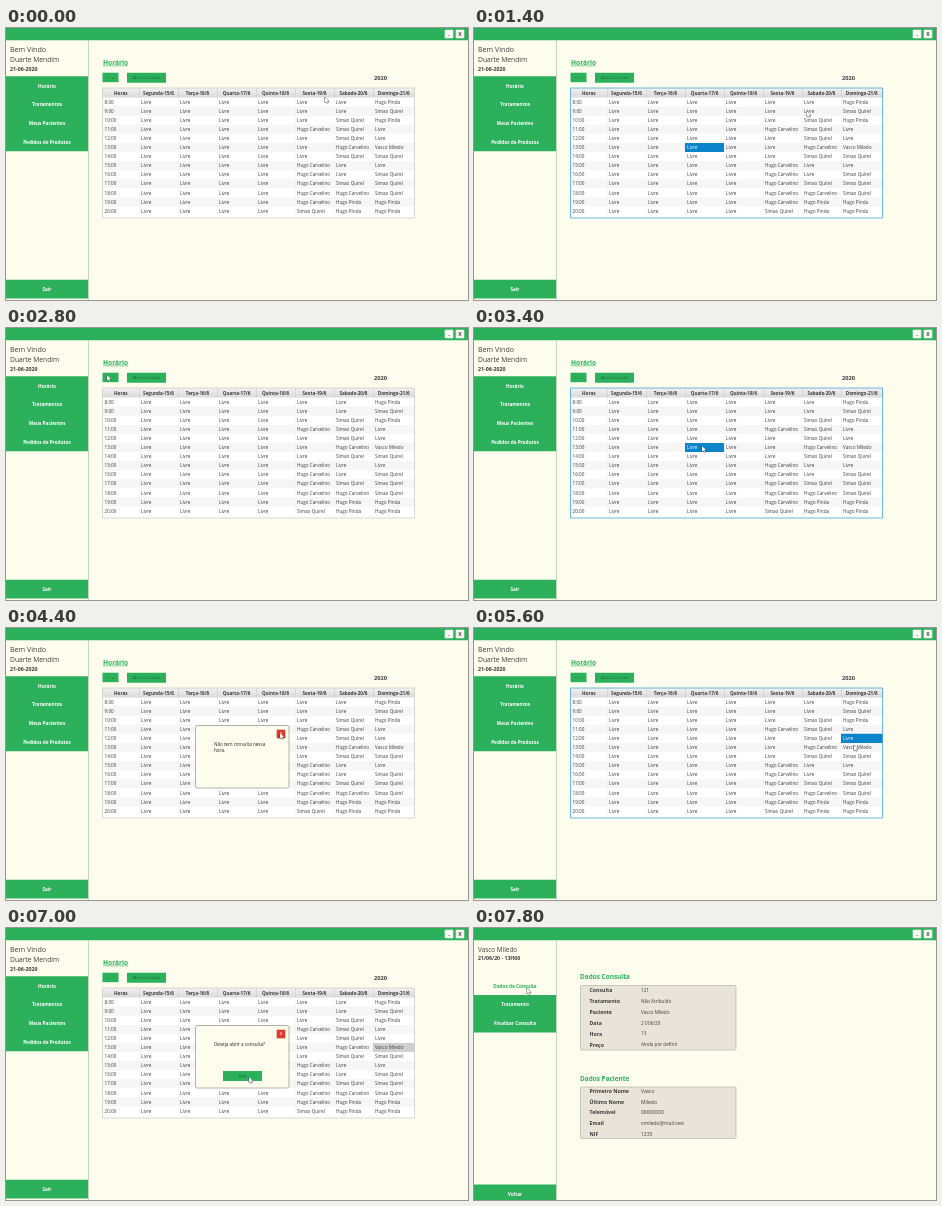
An HTML page with a canvas for the animation above (8000 ms loop, 462 px wide and 272 px high).

```html
<!DOCTYPE html>
<html lang="pt">
<head>
<meta charset="utf-8">
<title>Horário</title>
<style>
html, body { margin: 0; width: 100%; height: 100%; overflow: hidden; background: #fdfdee; }
canvas { display: block; width: 462px; height: 272px; }
</style>
</head>
<body>
<canvas id="stage"></canvas>
<script>
const W = 462, H = 272, LOOP = 8000, STEP = 200;
const GREEN = '#2db05b', CREAM = '#fdfdee', INK = '#3c3c3c';
const canvas = document.getElementById('stage');
const ctx = canvas.getContext('2d');
const scale = window.devicePixelRatio || 1;
canvas.width = W * scale;
canvas.height = H * scale;

const people = { L: 'Livre', D: 'Hugo Pinda', F: 'Hugo Carvelino', V: 'Simao Quirel', B: 'Vasco Miledo' };
const headers = ['Horas', 'Segunda-15/6', 'Terça-16/6', 'Quarta-17/6', 'Quinta-18/6',
  'Sexta-19/6', 'Sabado-20/6', 'Domingo-21/6'];
const free = 'L'.repeat(13);
const week = [free, free, free, free, 'LLLFLLLFFFFFV', 'LLVVVFVLLVFDD', 'DVDLLBVLVVVDD'];

const table = { x: 96.5, y: 60, w: 312, h: 130, first: 69.5, row: 9.08 };
const columnX = c => c ? 94 + 39 * c : table.x;
const pointer = new Path2D('M0 0V5.6L1.3 4.4L2.2 6.4L3.1 6L2.2 4.1H4Z');

// Pointer stops: time, x, y
const stops = [
  [0, 319, 69], [200, 319, 69], [800, 230, 119], [1000, 230, 119], [1400, 333, 83],
  [1600, 333, 83], [2400, 106, 48], [2800, 101, 47], [3000, 101, 47], [3400, 228, 118],
  [3600, 228, 118], [4000, 142, 49], [4200, 200, 80], [4400, 274, 105], [4600, 274, 105],
  [5000, 365, 108], [5400, 382, 112], [5600, 380, 117], [5800, 381, 119], [6000, 381, 119],
  [6600, 142, 49], [6800, 210, 120], [7000, 243, 149], [7400, 243, 149], [7800, 53, 60], [8000, 53, 60]
];

// Selected cell: from, to, column, row, focused
const selections = [
  [800, 2400, 3, 5, true], [3400, 4000, 3, 5, true], [4000, 5200, 3, 5, false],
  [5200, 5800, 7, 4, true], [5800, 6600, 7, 5, true], [6600, 7400, 7, 5, false]
];

function box(x, y, w, h, fill, stroke, radius = 0) {
  ctx.beginPath();
  ctx.roundRect(x, y, w, h, radius);
  ctx.fillStyle = fill;
  ctx.fill();
  if (stroke) {
    ctx.strokeStyle = stroke;
    ctx.lineWidth = 0.7;
    ctx.stroke();
  }
}

// y is the middle of the capital letters
function text(str, x, y, size, { color = INK, bold = false, align = 'left' } = {}) {
  ctx.font = `${bold ? 700 : 400} ${size}px "Open Sans", "Noto Sans", sans-serif`;
  ctx.textAlign = align;
  ctx.fillStyle = color;
  ctx.fillText(str, x, y + size * 0.36);
}

function button(label, x, y, w, h, size) {
  box(x, y, w, h, GREEN);
  text(label, x + w / 2, y + h / 2, size, { color: '#176b36', align: 'center' });
}

function menu(labels, y, h = 18.75) {
  box(0, y, 82, h * labels.length, GREEN);
  labels.forEach((label, i) =>
    text(label, 41, y + h * (i + 0.5) + 0.4, 4.7, { color: '#fff', bold: true, align: 'center' }));
}

function drawWindow() {
  box(0, 0, W, H, CREAM);
  box(0, 0, W, 12.3, GREEN);
  box(82, 12.3, 0.8, H, '#b4cbae');
  for (const [x, label] of [[439, '_'], [450, 'X']]) {
    box(x, 2, 8, 8, '#fbfbf4', '#dcebdc');
    text(label, x + 4, label === '_' ? 5 : 6, 5, { bold: true, align: 'center' });
  }
}

function drawTable(selection) {
  const { x, y, w, h, first, row } = table;
  const focused = selection && selection[4];
  box(x, y, w, h, '#fff');
  const shade = ctx.createLinearGradient(0, y, 0, first);
  shade.addColorStop(0, '#f1f1f1');
  shade.addColorStop(1, '#dadada');
  box(x, y, w, first - y, shade);
  for (let r = 1; r < 13; r += 2) box(x, first + r * row, w, row, '#f6f6f6');
  headers.forEach((header, c) => {
    const left = columnX(c);
    const right = c < 7 ? columnX(c + 1) : x + w;
    text(header, (left + right) / 2, 65, 4.6, { bold: true, align: 'center' });
    if (c) {
      box(left, y, 0.5, first - y, '#c8c8c8');
      box(left, first, 0.4, 13 * row, '#ededed');
    }
    for (let r = 0; r < 13; r++) {
      const top = first + r * row;
      const picked = selection && selection[2] === c && selection[3] === r;
      if (picked) box(left, top, right - left, row, focused ? '#0b84cc' : '#d0d0d0');
      const label = c ? people[week[c - 1][r]] : `${r + 8}:00`;
      text(label, left + 2, top + row / 2, 4.65, { color: picked && focused ? '#fff' : INK });
    }
  });
  box(x, y, w, h, 'transparent', focused ? '#2b9bd8' : '#c8c8c2');
}

function drawDialog(confirm) {
  const dark = { color: '#222' };
  box(189.5, 97.5, 93.5, 62.5, CREAM, '#93938a', 2);
  box(271, 102, 8, 8, '#e23a2c', '#c9483c');
  text('x', 275, 105.6, 4.5, { color: '#fff', align: 'center' });
  if (confirm) {
    text('Deseja abrir a consulta?', 208, 116.8, 4.6, dark);
    button('Sim', 217, 143, 39, 10, 4.6);
  } else {
    text('Não tem consulta nessa', 208, 116.6, 4.6, dark);
    text('hora.', 208, 122.8, 4.6, dark);
  }
}

function drawSchedule(time) {
  text('Bem Vindo', 4, 21.5, 7.1);
  text('Duarte Mendim', 4, 31.5, 6.7);
  text('21-06-2020', 4, 41, 5.3, { bold: true });
  menu(['Horário', 'Tratamentos', 'Meus Pacientes', 'Pedidos de Produtos'], 48.2);
  menu(['Sair'], 251.7);
  text('Horário', 97, 34.2, 6.6, { color: GREEN, bold: true });
  box(97, 37.6, 25, 0.6, GREEN);
  button('<   >', 96.5, 44.7, 16, 9.5, 4.3);
  button('Abrir Consulta', 121, 44.7, 39, 10, 4.15);
  text('2020', 368, 50, 5.7, { bold: true });
  drawTable(selections.find(s => time >= s[0] && time < s[1]));
  if (time >= 4000 && time < 4600) drawDialog(false);
  if (time >= 6600) drawDialog(true);
}

function drawPanel(title, titleY, y, h, rows, firstRow, pitch, valueSize) {
  text(title, 106, titleY, 6.45, { color: GREEN, bold: true });
  box(106.5, y, 155.5, h, '#e9e4d9', '#b9b5ab', 1);
  rows.forEach(([label, value], i) => {
    text(label, 115.5, firstRow + i * pitch, 5.2, { bold: true });
    text(value, 167, firstRow + i * pitch, valueSize);
  });
}

function drawAppointment() {
  text('Vasco Miledo', 4, 21.5, 6.4);
  text('21/06/20 - 13H00', 4, 30.5, 5.2, { bold: true });
  text('Dados da Consulta', 41, 57.9, 4.7, { color: GREEN, bold: true, align: 'center' });
  menu(['Tratamento', 'Finalizar Consulta'], 67);
  menu(['Voltar'], 256.4);
  drawPanel('Dados Consulta', 49, 57.5, 64.5, [
    ['Consulta', '121'], ['Tratamento', 'Não Atribuído'], ['Paciente', people.B],
    ['Data', '21/06/20'], ['Hora', '13'], ['Preço', 'Ainda por definir']
  ], 62, 10.95, 4.65);
  drawPanel('Dados Paciente', 150.5, 159, 51.5, [
    ['Primeiro Nome', 'Vasco'], ['Último Nome', 'Miledo'], ['Telemóvel', '00000000'],
    ['Email', 'vmiledo@mail.test'], ['NIF', '1235']
  ], 163.5, 10.55, 5);
}

function drawPointer(time) {
  const i = stops.findIndex(s => s[0] > time);
  const [t0, x0, y0] = stops[i - 1];
  const [t1, x1, y1] = stops[i];
  const u = (time - t0) / (t1 - t0);
  const ease = u * u * (3 - 2 * u);
  ctx.save();
  ctx.translate(x0 + (x1 - x0) * ease, y0 + (y1 - y0) * ease);
  ctx.fillStyle = '#fff';
  ctx.strokeStyle = '#333';
  ctx.lineWidth = 0.8;
  ctx.stroke(pointer);
  ctx.fill(pointer);
  ctx.restore();
}

function frame(now) {
  const time = Math.floor(now % LOOP / STEP) * STEP;
  ctx.setTransform(scale, 0, 0, scale, 0, 0);
  drawWindow();
  if (time < 7400) drawSchedule(time);
  else drawAppointment();
  drawPointer(time);
  requestAnimationFrame(frame);
}
requestAnimationFrame(frame);
</script>
</body>
</html>
```
